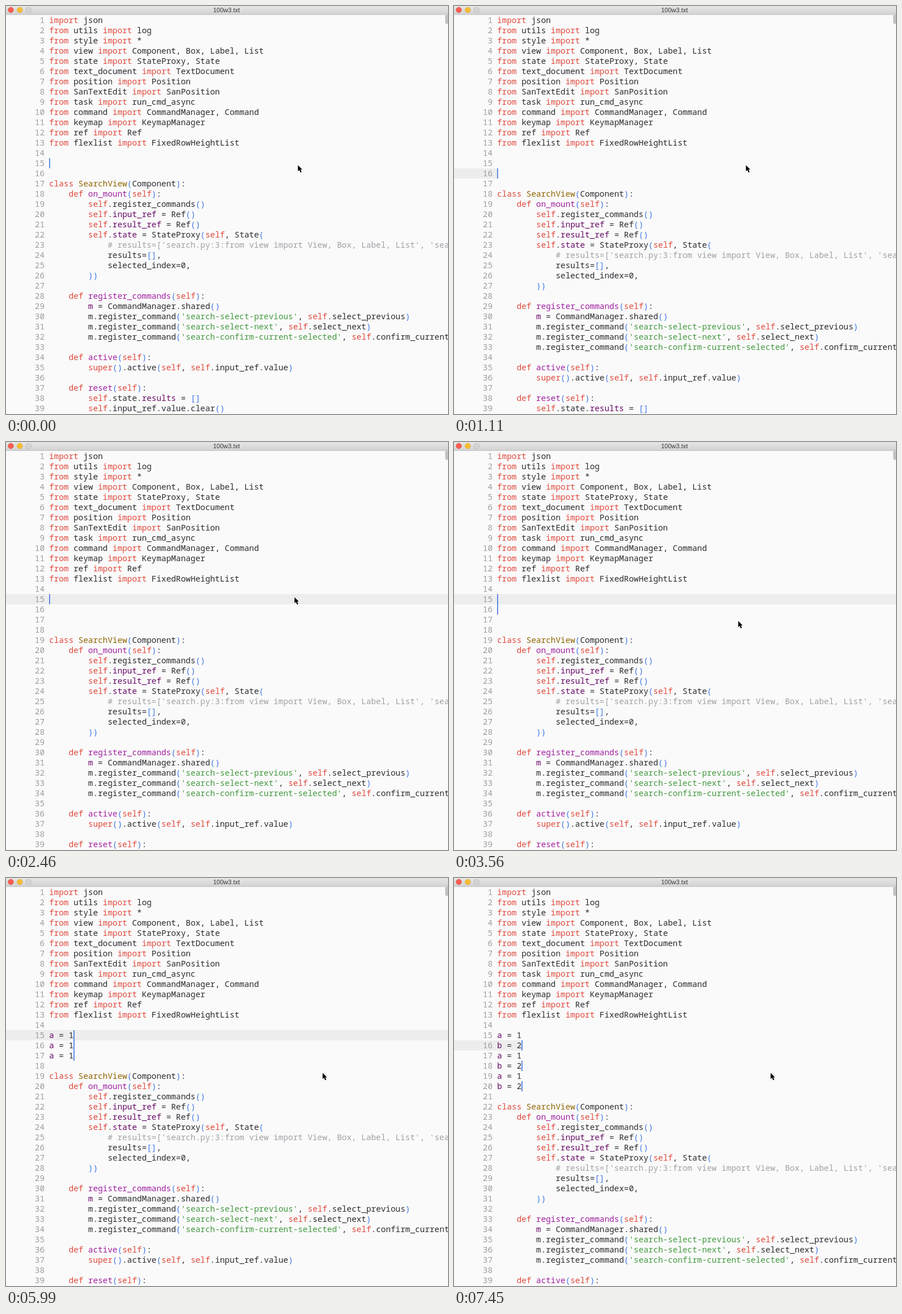
These frames come from a looping animation (779 px wide and 719 px high, 8 s). An HTML page with a canvas:

```html
<!DOCTYPE html>
<html lang="en">
<head>
<meta charset="utf-8">
<title>Multiple carets</title>
<style>
  html, body { margin: 0; width: 100%; height: 100%; overflow: hidden; background: #fafafa; }
  canvas { display: block; }
</style>
</head>
<body>
<canvas id="stage" width="779" height="719"></canvas>
<script>
const ctx = document.getElementById('stage').getContext('2d');
const LOOP = 8000, WIDTH = 779, HEIGHT = 719;
const LEFT = 76, TOP = 16, ROW = 18, CHAR = 8.6, VISIBLE_ROWS = 39;
const CODE_FONT = `${CHAR / 0.6}px "Noto Sans Mono", monospace`;
const COLOR = {
  text: '#2b2c31', keyword: '#e0493c', name: '#a020a0', type: '#8f6400', target: '#660a66',
  bracket: '#4078e8', string: '#43993f', comment: '#a0a1a7', number: '#9c9da0', caret: '#3f74e0'
};

const HEAD = `import json
from utils import log
from style import *
from view import Component, Box, Label, List
from state import StateProxy, State
from text_document import TextDocument
from position import Position
from SanTextEdit import SanPosition
from task import run_cmd_async
from command import CommandManager, Command
from keymap import KeymapManager
from ref import Ref
from flexlist import FixedRowHeightList
`.split('\n');

const BODY = `
class SearchView(Component):
    def on_mount(self):
        self.register_commands()
        self.input_ref = Ref()
        self.result_ref = Ref()
        self.state = StateProxy(self, State(
            # results=['search.py:3:from view import View, Box, Label, List', 'search.py
            results=[],
            selected_index=0,
        ))

    def register_commands(self):
        m = CommandManager.shared()
        m.register_command('search-select-previous', self.select_previous)
        m.register_command('search-select-next', self.select_next)
        m.register_command('search-confirm-current-selected', self.confirm_current_selected)

    def active(self):
        super().active(self, self.input_ref.value)

    def reset(self):
        self.state.results = []
        self.input_ref.value.clear()`.split('\n');

const TOKEN = new RegExp([
  '(?<comment>#.*)',
  "(?<string>'[^']*')",
  '(?<keyword>\\b(?:import|from|class|def|self|super)\\b)',
  '(?<name>(?<=def )\\w+)',
  '(?<type>(?<=class )\\w+)',
  '(?<target>\\w+(?= =))',
  '(?<bracket>[()\\[\\]]+)',
  '(?<text>\\w+|[^\\w\\s()\\[\\]])'
].join('|'), 'g');

// Pointer tip moves: start time, end time, destination.
const POINTER_START = [514, 280];
const POINTER_MOVES = [
  [2060, 2390, 508, 273],
  [2550, 2840, 501, 290],
  [3260, 3560, 500.5, 315],
  [3970, 4120, 557.5, 343]
];
const KEYS_A = [5070, 5190, 5610, 5720, 5990];
const KEYS_B = [6710, 6910, 6985, 7060, 7450];

const typed = (text, times, t) => text.slice(0, times.filter(time => t >= time).length);
const rowTop = row => TOP + (row - 1) * ROW;

function editorState(t) {
  const a = typed('a = 1', KEYS_A, t), b = typed('b = 2', KEYS_B, t);
  if (t >= 6380) {
    return { lines: [a, b, a, b, a, b], carets: [16, 18, 20], column: b.length, mark: [16, LEFT + b.length * CHAR + 1] };
  }
  if (t >= 2400) {
    const carets = [15];
    if (t >= 3080) carets.push(16);
    if (t >= 3700) carets.push(17);
    return { lines: [a, a, a], carets, column: a.length, mark: [15, WIDTH] };
  }
  const count = t < 1050 ? 1 : t < 1460 ? 2 : 3;
  return { lines: Array(count).fill(''), carets: [14 + count], column: 0, mark: [14 + count, count > 1 ? LEFT : 0] };
}

function pointerAt(t) {
  let [x, y] = POINTER_START;
  for (const [start, end, toX, toY] of POINTER_MOVES) {
    const p = Math.min(1, Math.max(0, (t - start) / (end - start)));
    const eased = p * p * (3 - 2 * p);
    x += (toX - x) * eased;
    y += (toY - y) * eased;
  }
  return [x, y];
}

function rect(color, x, y, w, h) {
  ctx.fillStyle = color;
  ctx.fillRect(x, y, w, h);
}

function drawCode(line, baseline) {
  for (const match of line.matchAll(TOKEN)) {
    const kind = Object.keys(match.groups).find(key => match.groups[key] !== undefined);
    ctx.fillStyle = COLOR[kind];
    ctx.fillText(match[0], LEFT + match.index * CHAR, baseline);
  }
}

function drawEditor(t) {
  const { lines, carets, column, mark } = editorState(t);
  rect('#fafafa', 0, 0, WIDTH, HEIGHT);
  rect('#ededed', 0, rowTop(mark[0]), mark[1], ROW);
  ctx.font = CODE_FONT;
  [...HEAD, ...lines, ...BODY].slice(0, VISIBLE_ROWS).forEach((line, i) => {
    const baseline = rowTop(i + 1) + 14;
    ctx.textAlign = 'right';
    ctx.fillStyle = COLOR.number;
    ctx.fillText(i + 1, 68, baseline);
    ctx.textAlign = 'left';
    drawCode(line, baseline);
  });
  for (const row of carets) {
    rect(COLOR.caret, Math.round(LEFT + column * CHAR), rowTop(row), 1.6, ROW);
  }
}

function drawWindow() {
  const bar = ctx.createLinearGradient(0, 0, 0, 15);
  bar.addColorStop(0, '#e6e6e6');
  bar.addColorStop(1, '#d2d2d2');
  rect(bar, 0, 0, WIDTH, 15);
  rect('#bcbcbc', 0, 14.5, WIDTH, 1);

  [['#fb5f53', '#de4a40'], ['#fcbd2e', '#dca032'], ['#d4d4d4', '#b9b9b9']].forEach(([fill, edge], i) => {
    ctx.beginPath();
    ctx.arc(8.5 + i * 15.7, 7, 4.7, 0, Math.PI * 2);
    ctx.fillStyle = fill;
    ctx.fill();
    ctx.strokeStyle = edge;
    ctx.lineWidth = 0.8;
    ctx.stroke();
  });

  ctx.font = '11px "Liberation Sans", sans-serif';
  ctx.textAlign = 'center';
  ctx.fillStyle = '#3a3a3a';
  ctx.fillText('100w3.txt', 388.5, 11);

  ctx.beginPath();
  ctx.roundRect(774, 15.5, 8, 16, 3);
  ctx.fillStyle = '#c2c2c2';
  ctx.fill();
}

function drawPointer(t) {
  ctx.save();
  ctx.translate(...pointerAt(t));
  const arrow = new Path2D('M0.5 0.5V11.2L3 9L5 13.4L7 12.5L5.1 8.3H8.2Z');
  ctx.lineJoin = 'round';
  ctx.lineWidth = 1.6;
  ctx.strokeStyle = '#fff';
  ctx.stroke(arrow);
  ctx.fillStyle = '#000';
  ctx.fill(arrow);
  ctx.restore();
}

function frame() {
  const t = performance.now() % LOOP;
  drawEditor(t);
  drawWindow();
  drawPointer(t);
  requestAnimationFrame(frame);
}
frame();
</script>
</body>
</html>
```
